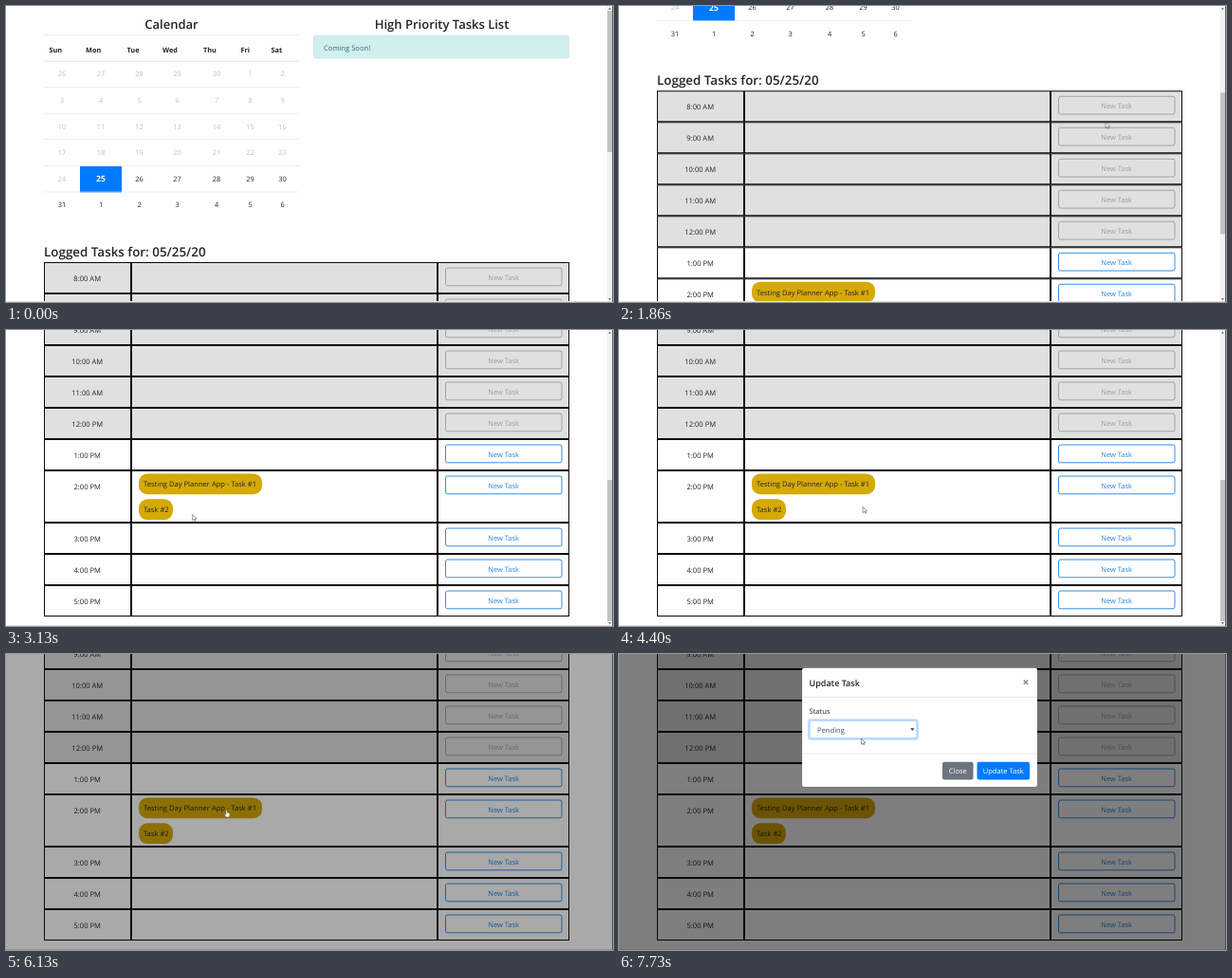
These frames come from a looping animation (640x312 px, 8 s). An HTML page:

```html
<!DOCTYPE html>
<html lang="en">
<head>
<meta charset="utf-8">
<title>Day planner</title>
<style>
  html, body { margin: 0; width: 100%; height: 100%; overflow: hidden; background: #fdfefd; }
  svg { display: block; width: 640px; height: 312px; }
  text { font-family: "Open Sans", "Noto Sans", sans-serif; text-rendering: geometricPrecision; }
</style>
</head>
<body>
<svg id="stage" viewBox="0 0 640 312"></svg>
<script>
const DURATION = 8000;
const INK = '#212529', BLUE = '#007bff', PAPER = '#fdfefd';
const stage = document.getElementById('stage');

function add(parent, tag, attrs = {}, content = '') {
  const node = document.createElementNS('http://www.w3.org/2000/svg', tag);
  for (const key in attrs) node.setAttribute(key, attrs[key]);
  node.textContent = content;
  return parent.appendChild(node);
}
const group = (parent, attrs) => add(parent, 'g', attrs);
const rect = (parent, x, y, width, height, fill, attrs) =>
  add(parent, 'rect', { x, y, width, height, fill, ...attrs });

// Text placed by the vertical middle of its capitals.
function label(parent, content, x, middle, { size = 7.6, fill = INK, weight = 400, anchor = 'middle' } = {}) {
  return add(parent, 'text', {
    x, y: middle + size * 0.357, fill,
    'font-size': size, 'font-weight': weight, 'text-anchor': anchor
  }, content);
}

function drawCalendar(parent) {
  const names = ['Sun', 'Mon', 'Tue', 'Wed', 'Thu', 'Fri', 'Sat'];
  const starts = [45.5, 84, 127.5, 165, 208, 247.5, 279.5];
  const centers = [59, 100, 140.5, 180.5, 222, 257.5, 291.5];
  label(parent, 'Calendar', 174.5, 19, { size: 13, weight: 600 });
  names.forEach((name, i) =>
    label(parent, name, starts[i], 46.5, { size: 7.3, weight: 700, anchor: 'start' }));
  rect(parent, 40, 30, 269, 0.6, '#e4e7e8');
  const first = new Date(2020, 3, 26);
  for (let row = 0; row < 6; row++) {
    rect(parent, 40, 57.7 + row * 27.6, 269, row ? 0.6 : 1, '#e4e7e8');
    for (let col = 0; col < 7; col++) {
      const index = row * 7 + col;
      const day = new Date(first.getFullYear(), first.getMonth(), first.getDate() + index).getDate();
      const today = index === 29;
      if (today) rect(parent, 78, 169, 44, 27.5, BLUE);
      label(parent, String(day), centers[col], 71.8 + row * 27.6, {
        size: today ? 8.6 : 7.4,
        weight: today ? 700 : 400,
        fill: today ? '#fff' : index < 29 ? '#bfc1c1' : INK
      });
    }
  }
}

function drawPriorities(parent) {
  label(parent, 'High Priority Tasks List', 459.5, 19, { size: 13, weight: 600 });
  rect(parent, 324.5, 31, 269, 24, '#d1efed', { rx: 2, stroke: '#bfe6e8', 'stroke-width': 0.6 });
  label(parent, 'Coming Soon!', 335, 44, { anchor: 'start', fill: '#35686f' });
}

function drawPill(parent, content, y, width) {
  rect(parent, 140, y, width, 21.8, '#d5a906', { rx: 9 });
  label(parent, content, 145, y + 11.3, { anchor: 'start' });
}

function drawSchedule(parent) {
  label(parent, 'Logged Tasks for: 05/25/20', 40, 259, { size: 13.4, weight: 600, anchor: 'start' });
  const edges = [40, 132, 455, 594];
  let top = 270;
  for (let hour = 8; hour <= 17; hour++) {
    const height = hour === 14 ? 55 : 33;
    const past = hour < 13;
    for (let i = 0; i < 3; i++) {
      rect(parent, edges[i] + 0.5, top + 0.5, edges[i + 1] - edges[i] - 1, height - 1,
        past ? '#dfe1e1' : PAPER, { stroke: '#0a0a0a', 'stroke-width': 1 });
    }
    const name = `${(hour + 11) % 12 + 1}:00 ${hour < 12 ? 'AM' : 'PM'}`;
    label(parent, name, 85.7, top + 17.3);
    rect(parent, 463.5, top + 6, 122.5, 18.8, 'none',
      { rx: 2, stroke: past ? '#a0a3a5' : '#338fee', 'stroke-width': 1 });
    label(parent, 'New Task', 524.7, top + 16, { size: 7.5, fill: past ? '#9b9ea0' : '#2a86e4' });
    top += height;
  }
  drawPill(parent, 'Testing Day Planner App - Task #1', 471.4, 130);
  drawPill(parent, 'Task #2', 498.3, 36);
}

function drawButton(parent, content, x, width, fill) {
  rect(parent, x, 113.8, width, 18.7, fill, { rx: 2 });
  label(parent, content, x + width / 2, 123.4, { size: 7.5, fill: '#fff' });
}

function drawModal(parent) {
  rect(parent, 193, 14.7, 248, 125.4, '#fefefe', { rx: 2, stroke: '#000', 'stroke-opacity': 0.2, 'stroke-width': 0.5 });
  label(parent, 'Update Task', 200.5, 30.5, { size: 9, weight: 600, anchor: 'start' });
  label(parent, '×', 429, 30.2, { size: 12, weight: 700, fill: '#7c7e80' });
  rect(parent, 193, 45, 248, 0.6, '#dee2e6');
  rect(parent, 193, 104.7, 248, 0.6, '#dee2e6');
  label(parent, 'Status', 200.5, 60.5, { anchor: 'start' });
  const ring = rect(parent, 199.8, 69.2, 115.2, 20.6, 'none',
    { rx: 2.5, stroke: '#bfdeff', 'stroke-width': 1.8 });
  const select = rect(parent, 201, 70.3, 113, 18.4, '#fff', { rx: 2, 'stroke-width': 0.7 });
  label(parent, 'Pending', 209, 80, { anchor: 'start', fill: '#495057' });
  add(parent, 'path', { d: 'M307.3 78.2h4l-2 2.9z', fill: '#343a40' });
  drawButton(parent, 'Close', 341, 32.5, '#6c757d');
  drawButton(parent, 'Update Task', 377.5, 55.5, BLUE);
  return { ring, select };
}

const page = group(stage);
drawCalendar(page);
drawPriorities(page);
drawSchedule(page);

const scrollbar = group(stage);
rect(scrollbar, 633.5, 0, 6, 312, '#f1f2f1');
add(scrollbar, 'path', { d: 'M635 3.4l1.5-1.7 1.5 1.7zM635 308.3l1.5 1.7 1.5-1.7z', fill: '#555' });
const thumb = rect(scrollbar, 634, 5, 5, 149, '#c1c2c1');

rect(stage, 0, 311, 640, 1, '#e2e2e2');
const backdrop = rect(stage, 0, 0, 640, 312, '#000');
const modal = group(stage);
const { ring, select } = drawModal(modal);
rect(stage, 639.2, 0, 0.8, 312, '#444');

const cursor = group(stage);
const arrow = add(cursor, 'path', {
  d: 'M0 0V6.2L1.5 4.9 2.5 7 3.4 6.6 2.5 4.5H4.4Z',
  fill: '#fff', stroke: '#444', 'stroke-width': 0.55
});
const hand = add(cursor, 'path', {
  d: 'M-.6.2Q0-.4.6.2V2.6L3.4 3.3V5.2L2.7 7.4H-.5L-2.2 4.6-1.7 4-.6 4.8Z',
  fill: '#fff', stroke: '#444', 'stroke-width': 0.45
});

// Keyframes are [time, value, value, ...].
const SCROLL = [[1340, 0], [1530, 61], [1870, 184], [2200, 300], [2340, 320]];
const POINTER = [
  [200, 535, 188], [600, 519, 128], [860, 519, 128], [1300, 518, 123], [1730, 518, 123],
  [2200, 500.5, 121.5], [2800, 500.5, 121.5], [3130, 196.7, 194.5], [3600, 214, 190],
  [4000, 214, 190], [4660, 285, 184], [4800, 285, 184], [5460, 319, 175.5],
  [5660, 312, 174], [6000, 232.5, 164.5], [6530, 232.5, 164.5], [7200, 258, 80],
  [7400, 258, 80], [7730, 255.5, 89]
];

const clamp = v => Math.max(0, Math.min(1, v));
const progress = (t, start, length) => clamp((t - start) / length);

function sample(keys, t) {
  const next = keys.findIndex(key => key[0] > t);
  if (next === 0) return keys[0].slice(1);
  if (next < 0) return keys[keys.length - 1].slice(1);
  const a = keys[next - 1], b = keys[next];
  const p = (t - a[0]) / (b[0] - a[0]);
  return a.slice(1).map((v, i) => v + (b[i + 1] - v) * p);
}

const show = (node, visible) => node.setAttribute('visibility', visible ? 'visible' : 'hidden');

function overLink(x, y, scroll, modalOpen) {
  if (modalOpen) return false;
  const docY = y + scroll;
  const inside = (left, right, top, bottom) => x > left && x < right && docY > top && docY < bottom;
  return inside(140, 270, 471, 493) || inside(140, 176, 498, 520) ||
    (scroll > 290 && x > 463 && x < 586);
}

function render(t) {
  const [scroll] = sample(SCROLL, t);
  page.setAttribute('transform', `translate(0 ${-scroll})`);
  thumb.setAttribute('y', 5 + scroll * 0.478);

  const fade = progress(t, 6030, 150);
  backdrop.setAttribute('opacity', fade * 0.5);
  show(scrollbar, fade === 0);

  const slide = 1 - (1 - progress(t, 6190, 300)) ** 2;
  modal.setAttribute('opacity', progress(t, 6190, 150));
  modal.setAttribute('transform', `translate(0 ${-25 * (1 - slide)})`);

  const focused = t >= 7330;
  show(ring, focused);
  select.setAttribute('stroke', focused ? '#80bdff' : '#ced4da');

  const [x, y] = sample(POINTER, t);
  const pointing = overLink(x, y, scroll, t > 6400);
  cursor.setAttribute('transform', `translate(${x} ${y})`);
  show(arrow, t >= 200 && !pointing);
  show(hand, t >= 200 && pointing);
}

const startTime = performance.now();
function tick() {
  render((performance.now() - startTime) % DURATION);
  requestAnimationFrame(tick);
}
tick();
</script>
</body>
</html>
```
